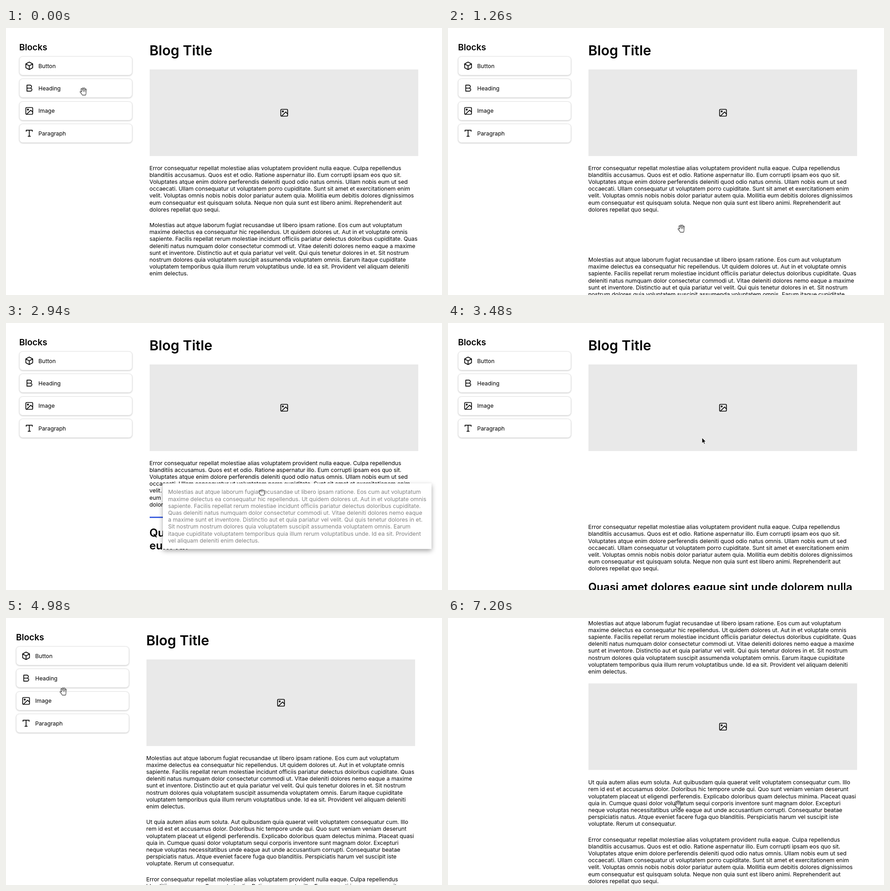
Animation of 956 by 586 pixels, one loop 7260 ms. Source, as an HTML page:

```html
<!DOCTYPE html>
<html lang="en">
<head>
<meta charset="utf-8">
<title>Block editor</title>
<style>
  html, body { margin: 0; width: 100%; height: 100%; overflow: hidden; background: #fff; }
  body { position: relative; color: #000; font: 12.35px/15.2px Inter, sans-serif; }
  div, svg { position: absolute; }
  h1, h2 { position: absolute; margin: 0; font-weight: 600; white-space: pre; }
  h1 { left: 314.5px; top: 31.4px; font-size: 30.4px; line-height: 37px; }
  h2 { left: 29px; top: 31.7px; font-size: 19px; line-height: 22.8px; }
  #page { left: 0; top: 0; width: 956px; height: 586px; }
  .card {
    width: 247.5px; height: 41.8px; box-sizing: border-box; background: #fff;
    border: 1px solid #e4e4e4; border-radius: 7.6px; box-shadow: 0 1px 3px rgba(0, 0, 0, .2);
  }
  .card svg { left: 10.5px; top: 10px; }
  .card span { position: absolute; left: 41px; top: 12.6px; }
  .icon { width: 20px; height: 20px; fill: none; stroke: currentColor; stroke-width: 2; stroke-linecap: round; stroke-linejoin: round; }
  .block { left: 314.5px; width: 589.5px; white-space: pre; }
  .heading { font-size: 24.05px; line-height: 28.5px; font-weight: 600; }
  .image { height: 190px; background: #e9e9e9; }
  .image svg { left: 285px; top: 85px; }
  #line { left: 314.5px; width: 589.5px; height: 2.85px; background: #4062e0; }
  .ghost { left: 0; top: 0; color: #808080; box-shadow: 0 4px 10px rgba(0, 0, 0, .36); }
  .sheet { width: 566.7px; padding: 11.4px; background: #fff; white-space: pre; }
  .cursor { left: 0; top: 0; width: 17px; height: 18px; overflow: visible; stroke-linejoin: round; stroke-linecap: round; }
</style>
</head>
<body>
<div id="page">
  <h2>Blocks</h2>
  <h1>Blog Title</h1>
  <div id="line"></div>
</div>
<script>
const LOOP = 7260, STEP = 60, GAP = 19, LINE = 2.85, ROW = 15.2, TOP = 90.5, COLUMN = 307;
const REST = 120, READY = 180;
const page = document.getElementById('page');
const line = document.getElementById('line');

const icons = {
  Button: '<path d="M12 2l9 5v10l-9 5-9-5V7zM3.3 7.2L12 12l8.7-4.8M12 22V12"/>',
  Heading: '<path d="M6 4h8a4 4 0 0 1 0 8H6zM6 12h9a4 4 0 0 1 0 8H6z"/>',
  Image: '<rect x="3" y="3" width="18" height="18" rx="2"/><circle cx="8.5" cy="8.5" r="1.5"/><path d="M21 15l-5-5L5 21"/>',
  Paragraph: '<path d="M4 7V4h16v3M9 20h6M12 4v16"/>'
};
const icon = name => `<svg class="icon" viewBox="0 0 24 24">${icons[name]}</svg>`;

// "/" breaks everywhere, "|" only in the column, "^" only in the dragged sheet
const texts = {
  error: 'Error consequatur repellat molestiae alias voluptatem provident nulla eaque. Culpa repellendus/blanditiis accusamus. Quos est et odio. Ratione aspernatur illo. Eum corrupti ipsam eos quo sit./Voluptates atque enim dolore perferendis deleniti quod odio natus omnis. Ullam nobis eum ut sed/occaecati. Ullam consequatur ut voluptatem porro cupiditate. Sunt sit amet et exercitationem enim/velit. Voluptas omnis nobis nobis dolor pariatur autem quia. Mollitia eum debitis dolores dignissimos/eum consequatur est quisquam soluta. Neque non quia sunt est libero animi. Reprehenderit aut/dolores repellat quo sequi.',
  molest: 'Molestias aut atque laborum fugiat recusandae ut libero ipsam ratione. Eos cum aut voluptatum/maxime delectus ea consequatur hic repellendus. Ut quidem dolores ut. Aut in et voluptate omnis/sapiente. Facilis repellat rerum molestiae incidunt officiis pariatur delectus doloribus cupiditate. ^Quas |deleniti natus numquam dolor consectetur commodi ut. Vitae deleniti dolores nemo eaque ^a maxime |sunt et inventore. Distinctio aut et quia pariatur vel velit. Qui quis tenetur dolores in et. ^Sit nostrum |nostrum dolores quia voluptatem suscipit assumenda voluptatem omnis. Earum ^itaque cupiditate |voluptatem temporibus quia illum rerum voluptatibus unde. Id ea sit. Provident ^vel aliquam deleniti |enim delectus.',
  ut: 'Ut quia autem alias eum soluta. Aut quibusdam quia quaerat velit voluptatem consequatur cum. Illo/rem id est et accusamus dolor. Doloribus hic tempore unde qui. Quo sunt veniam veniam deserunt/voluptatem placeat ut eligendi perferendis. Explicabo doloribus quam delectus minima. Placeat quasi/quia in. Cumque quasi dolor voluptatum sequi corporis inventore sunt magnam dolor. Excepturi/neque voluptas necessitatibus unde eaque aut unde accusantium corrupti. Consequatur beatae/perspiciatis natus. Atque eveniet facere fuga quo blanditiis. Perspiciatis harum vel suscipit iste/voluptate. Rerum ut consequatur.'
};
const columnText = s => s.replace(/\^/g, '').replace(/[|/]/g, '\n');
const sheetText = s => s.replace(/\|/g, '').replace(/[\^/]/g, '\n');

function add(parent, cls, html) {
  const el = document.createElement('div');
  el.className = cls;
  el.innerHTML = html;
  parent.append(el);
  return el;
}

const show = (el, on) => { el.style.visibility = on ? 'visible' : 'hidden'; };
const move = (el, x, y) => { el.style.transform = `translate(${x}px, ${y}px)`; };

const names = Object.keys(icons);
const cardHtml = name => `${icon(name)}<span>${name}</span>`;
const cardHome = name => [29, 62 + names.indexOf(name) * 49.4];
for (const name of names) {
  const card = add(page, 'card', cardHtml(name));
  [card.style.left, card.style.top] = cardHome(name).map(v => v + 'px');
}

const blocks = {};
function block(id, cls, html, height) {
  blocks[id] = { el: add(page, 'block ' + cls, html), height };
}
block('photo', 'image', icon('Image'), 190);
block('photo2', 'image', icon('Image'), 190);
block('head', 'heading', 'Quasi amet dolores eaque sint unde dolorem nulla\neum id.', 57);
for (const id in texts) {
  const text = columnText(texts[id]);
  block(id, '', text, text.split('\n').length * ROW);
}
blocks['|'] = { el: line, height: LINE };

// The whole story: each press of the pointer, with the block it carries
const drags = [
  { grab: 60, drop: 1200, from: [170, 139], to: [512, 440], id: 'head', card: 'Heading' },
  { grab: 2520, drop: 3480, from: [561, 490], to: [561, 260], id: 'molest', home: [344, 472] },
  { grab: 4320, drop: 4620, from: [189, 233], to: [498, 432], id: 'ut', card: 'Paragraph' },
  { grab: 5160, drop: 6300, from: [126, 161], to: [465, 445], id: 'photo2', card: 'Image' },
  { grab: 7080, drop: 7200, from: [504.5, 409], to: [504.5, 409] }
];
for (const d of drags.filter(d => d.id)) {
  d.home = d.home || cardHome(d.card);
  d.ghost = d.card
    ? add(document.body, 'card ghost', cardHtml(d.card))
    : add(document.body, 'sheet ghost', sheetText(texts[d.id]));
}

// Open and closed hand: outlined fingers on a palm
const palm = 'M5 11.5h7.8l-.6 4.4H6.4z';
const hand = fingers => [['#000', 3.5], ['#fff', 1.9]].map(([color, width]) =>
  `<path d="${fingers}${palm}" fill="${color}" stroke="${color}" stroke-width="${width}"/>`).join('');
const shapes = {
  open: hand('M2.2 10l3.4 4M4 4.2l2.2 7M7.3 2.4l.6 8M10.6 2.7l-.2 8M13.8 5.2l-1.2 7'),
  fist: hand('M3.2 10.6l2 3M5 7.4l.4 4M7.8 6.6v4M10.4 6.8v4M12.8 7.6v4'),
  arrow: '<path stroke="#fff" stroke-width=".9" d="M4.5 1v12l2.8-2.6 1.9 4.3 2-.9-1.9-4.1h3.6z"/>'
};
const cursors = {};
for (const kind in shapes) {
  document.body.insertAdjacentHTML('beforeend', `<svg class="cursor" viewBox="0 0 17 18">${shapes[kind]}</svg>`);
  cursors[kind] = document.body.lastElementChild;
}

function ease(t, from, to) {
  const p = Math.min(1, Math.max(0, (t - from) / (to - from)));
  return p * p * (3 - 2 * p);
}

const mix = (a, b, p) => a.map((v, i) => v + (b[i] - v) * p);

function pointerAt(t) {
  const i = drags.findIndex(d => t < d.drop);
  const d = drags[i], last = drags[i - 1];
  if (!d) return drags[drags.length - 1].to;
  if (t < d.grab) {
    return last ? mix(last.to, d.from, ease(t, last.drop + REST, d.grab - READY)) : d.from;
  }
  // A sideways drag swings up before it comes down, then hovers
  const p = ease(t, d.grab, d.drop - .15 * (d.drop - d.grab));
  const [x, y] = mix(d.from, d.to, p);
  const swing = .35 * (d.to[0] - d.from[0]);
  return [x, y - swing * Math.sin(2 * Math.PI * p) * (1 - p)];
}

const scrollAt = t => t < 2520 ? 29 * ease(t, 1740, 2160) : 296.5 * ease(t, 6600, 7020);

function place(order) {
  let y = TOP;
  return order.map(id => {
    const top = y, { height } = blocks[id];
    y += height + GAP;
    return { id, top, bottom: top + height };
  });
}

function insert(order, id, [x, y]) {
  if (x < COLUMN) return order;
  const i = place(order).filter(b => (b.top + b.bottom) / 2 < y).length;
  return [...order.slice(0, i), id, ...order.slice(i)];
}

function orderAt(t) {
  let order = ['photo', 'error', 'molest'];
  for (const d of drags) {
    if (!d.id || t < d.grab) continue;
    order = order.filter(id => id !== d.id);
    order = t < d.drop ? insert(order, '|', pointerAt(t)) : insert(order, d.id, d.to);
  }
  return order;
}

function draw(t) {
  const [x, y] = pointerAt(t);
  const scroll = scrollAt(t);
  const placed = place(orderAt(t));
  // A scrollbar outside the view moves the centred page
  const shift = placed[placed.length - 1].bottom > 600 ? 7 : 0;
  move(page, -shift, -scroll);

  for (const id in blocks) show(blocks[id].el, false);
  for (const { id, top } of placed) {
    const fresh = drags.some(d => d.id === id && t >= d.drop && t < d.drop + REST);
    blocks[id].el.style.top = top + 'px';
    show(blocks[id].el, !fresh);
  }

  for (const d of drags.filter(d => d.id)) {
    show(d.ghost, t >= d.grab && t < d.drop);
    move(d.ghost, d.home[0] - shift + x - d.from[0], d.home[1] + y - d.from[1]);
  }

  const pressed = drags.some(d => t >= d.grab && t < d.drop);
  const onPhoto = x > COLUMN && placed.some(b =>
    b.id.startsWith('photo') && y + scroll > b.top && y + scroll < b.bottom);
  const kind = pressed ? 'fist' : onPhoto ? 'arrow' : 'open';
  for (const k in cursors) {
    show(cursors[k], k === kind);
    move(cursors[k], x - 8.5, y - 9);
  }
}

const start = performance.now();
function tick() {
  const t = (performance.now() - start) % LOOP;
  draw(Math.floor(t / STEP) * STEP);
  requestAnimationFrame(tick);
}
tick();
</script>
</body>
</html>
```
